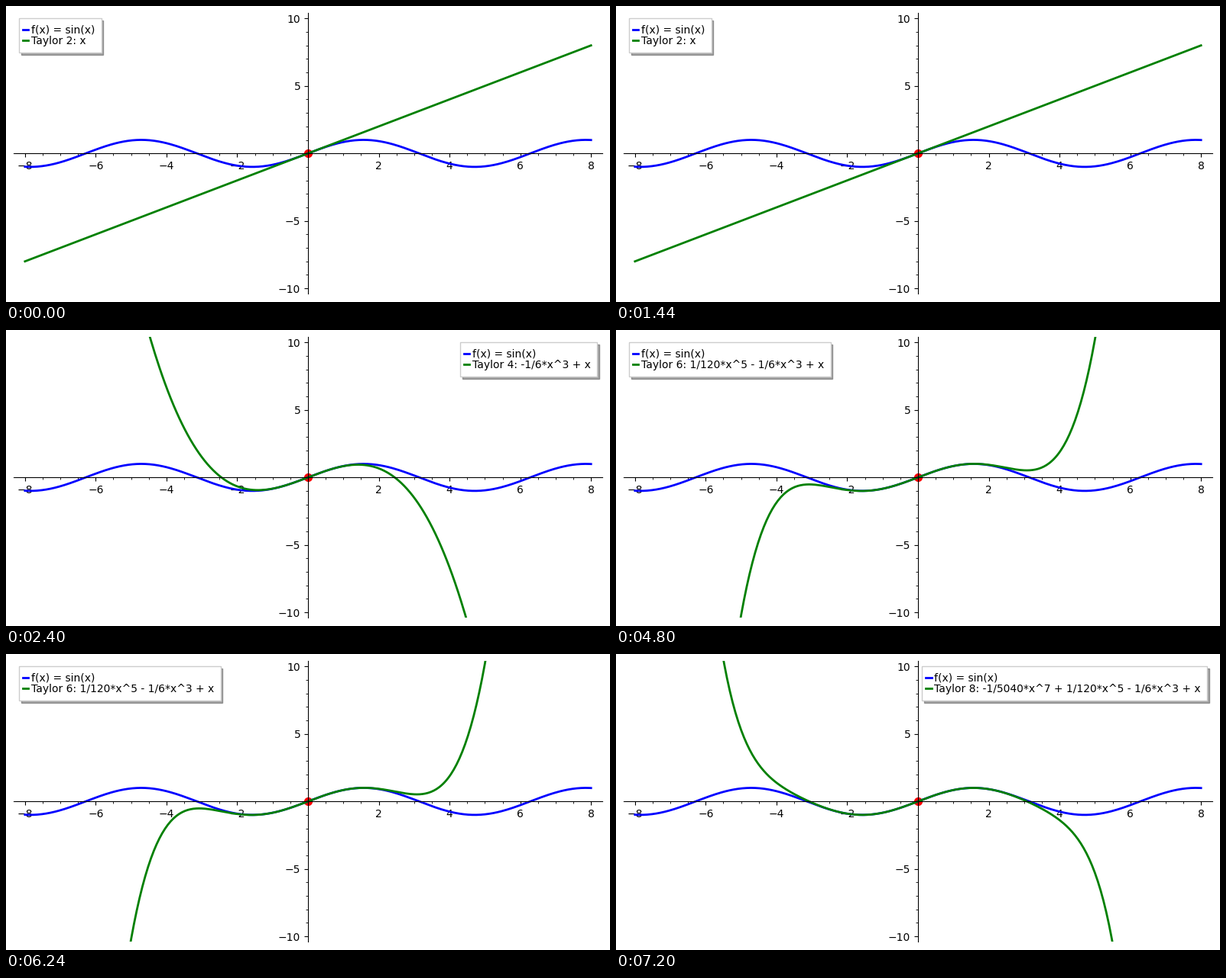
Animation, 790 px wide and 388 px high, one loop 9600 ms. Source, as a matplotlib script:

```python
import math

import matplotlib.pyplot as plt
import numpy as np
from matplotlib.animation import FuncAnimation
from matplotlib.ticker import MultipleLocator

WIDTH, HEIGHT, DPI = 790, 388, 100
X_MAX, Y_MAX, MARGIN = 8, 10, 1.04
STEP_MS = 2400
ORDERS = [2, 4, 6, 8]

plt.rcParams["font.family"] = "DejaVu Sans"


def taylor_values(x, order):
    return sum((-1) ** (n // 2) * x**n / math.factorial(n)
               for n in range(1, order, 2))


def taylor_text(order):
    """Write the polynomial from its highest power down to x."""
    text = ""
    for n in range(order - 1, 0, -2):
        negative = n // 2 % 2 == 1
        if text:
            text += " - " if negative else " + "
        elif negative:
            text = "-"
        text += "x" if n == 1 else f"1/{math.factorial(n)}*x^{n}"
    return text


def nonzero_ticks(limit, step):
    return [t for t in range(-limit, limit + 1, step) if t]


fig = plt.figure(figsize=(WIDTH / DPI, HEIGHT / DPI), dpi=DPI, facecolor="white")
ax = fig.add_axes([10 / WIDTH, 10.8 / HEIGHT, 770 / WIDTH, 368 / HEIGHT])
ax.set_xlim(-X_MAX * MARGIN, X_MAX * MARGIN)
ax.set_ylim(-Y_MAX * MARGIN, Y_MAX * MARGIN)

# Axes cross at the origin
ax.spines[["right", "top"]].set_visible(False)
for side in ("left", "bottom"):
    ax.spines[side].set_position("zero")
ax.set_xticks(nonzero_ticks(X_MAX, 2))
ax.set_yticks(nonzero_ticks(Y_MAX, 5))
ax.xaxis.set_minor_locator(MultipleLocator(0.5))
ax.yaxis.set_minor_locator(MultipleLocator(1))

x = np.linspace(-X_MAX, X_MAX, 401)
ax.scatter([0], [0], s=50, color="red", zorder=0)
ax.plot(x, np.sin(x), color="blue", lw=2, label="f(x) = sin(x)")
approx, = ax.plot([], [], color="green", lw=2)


def draw(i):
    order = ORDERS[i]
    approx.set_data(x, taylor_values(x, order))
    approx.set_label(f"Taylor {order}: {taylor_text(order)}")
    ax.legend(loc="upper right" if i % 2 else "upper left",
              fancybox=False, shadow=True, numpoints=2, borderpad=0.6,
              handlelength=0.05, handletextpad=0.5, labelspacing=0.02)
    return ()


anim = FuncAnimation(fig, draw, frames=len(ORDERS), interval=STEP_MS,
                     init_func=lambda: (), repeat=True, repeat_delay=0)
plt.show()
```
